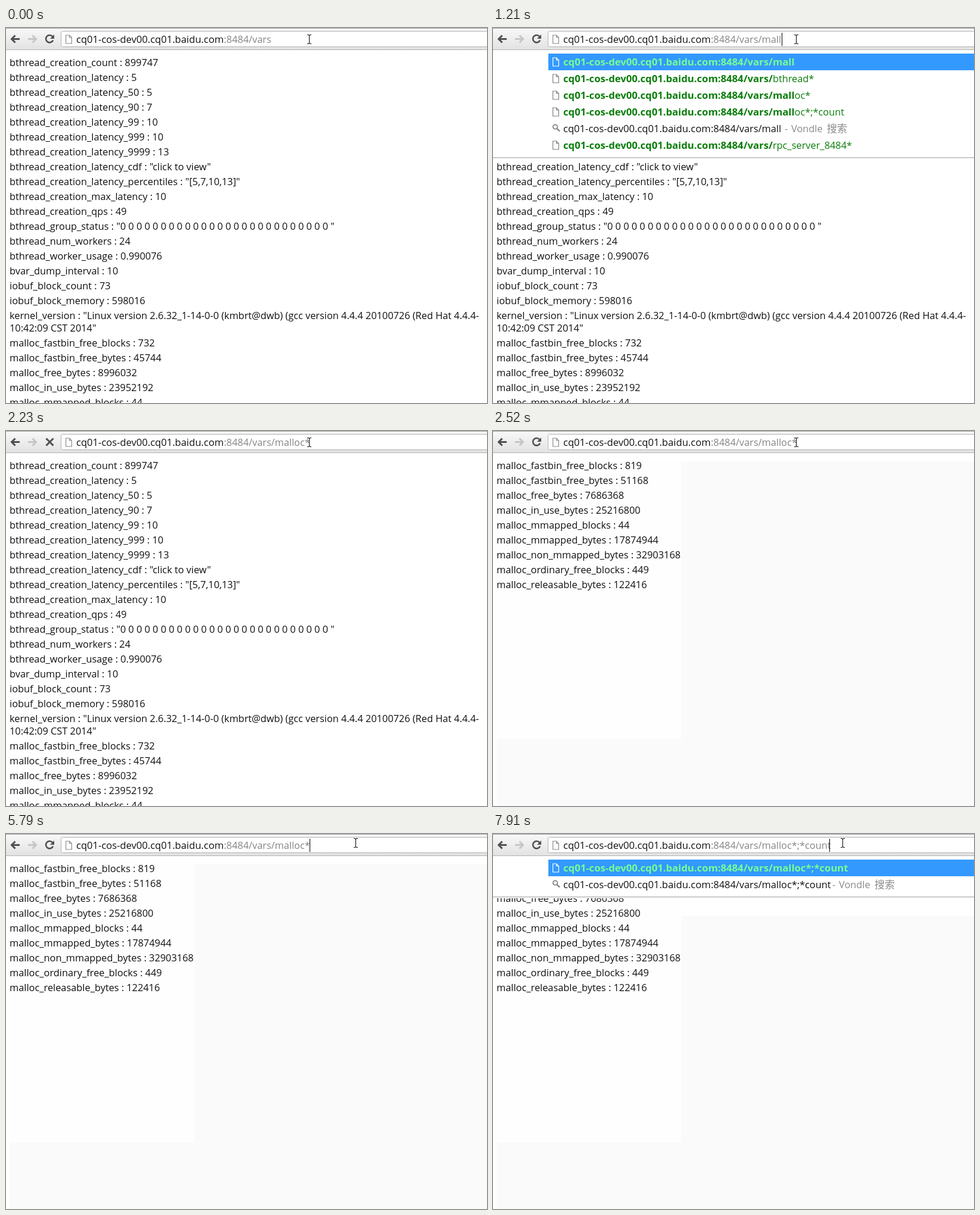
Write an HTML page that moves like this. It is 808 px wide and 630 px high and loops after 8000 ms.

```html
<!DOCTYPE html>
<html lang="en">
<head>
<meta charset="utf-8">
<title>Server variables</title>
<style>
  html, body { margin: 0; width: 100%; height: 100%; overflow: hidden; background: #fff; }
  svg { display: block; }
  text { font: 16.35px "Open Sans", "Noto Sans", "Noto Sans CJK SC", sans-serif; white-space: pre; }
  .host { font-size: 16.6px; }
  .bold { font-size: 16.7px; font-weight: 700; }
  .cjk { font: 17px "Noto Sans CJK SC", "Noto Sans CJK", sans-serif; }
</style>
</head>
<body>
<svg width="808" height="630" viewBox="0 0 808 630">
  <defs>
    <linearGradient id="bar" x2="0" y2="1">
      <stop stop-color="#f8f8f8"/><stop offset="1" stop-color="#e2e2e2"/>
    </linearGradient>
    <g id="sheet" fill="none" stroke-width="1.2">
      <path d="M.6-7H6.5L10.4-3V7H.6ZM6.5-7V-3H10.4"/>
    </g>
    <g id="lens" fill="none" stroke="#808080">
      <circle cx="4.5" cy="-2" r="3.7" stroke-width="1.7"/><path d="M7.4 1L12 5.4" stroke-width="2.4"/>
    </g>
  </defs>
  <g id="page"></g>
  <g id="popup"></g>
  <g>
    <rect width="808" height="37" fill="url(#bar)"/>
    <path d="M0 .5H808" stroke="#a0a0a0"/>
    <path d="M0 36.5H808" stroke="#b2b2b2"/>
    <rect x="92.5" y="5.5" width="730" height="26" rx="3" fill="#fff" stroke="#b0b0b0"/>
    <g fill="none" stroke-width="3">
      <path d="M23 18.5H10M15.5 12.5L9.5 18.5L15.5 24.5" stroke="#505050"/>
      <path d="M37 18.5H50M44.5 12.5L50.5 18.5L44.5 24.5" stroke="#c6c6c6"/>
    </g>
    <use href="#sheet" x="100" y="19" stroke="#8c8c8c"/>
  </g>
  <g id="address"></g>
  <g id="mouse"></g>
</svg>
<script>
const LOOP = 8000;
const HOST = 'cq01-cos-dev00.cq01.baidu.com', PORT = ':8484';
const GREEN = '#0a7d0a', BLUE = '#3399ff';

const ALL_VARS = `bthread_creation_count : 899747
bthread_creation_latency : 5
bthread_creation_latency_50 : 5
bthread_creation_latency_90 : 7
bthread_creation_latency_99 : 10
bthread_creation_latency_999 : 10
bthread_creation_latency_9999 : 13
bthread_creation_latency_cdf : "click to view"
bthread_creation_latency_percentiles : "[5,7,10,13]"
bthread_creation_max_latency : 10
bthread_creation_qps : 49
bthread_group_status : "${'0 '.repeat(26)}"
bthread_num_workers : 24
bthread_worker_usage : 0.990076
bvar_dump_interval : 10
iobuf_block_count : 73
iobuf_block_memory : 598016
kernel_version : "Linux version 2.6.32_1-14-0-0 (kmbrt@dwb) (gcc version 4.4.4 20100726 (Red Hat 4.4.4-
10:42:09 CST 2014"
malloc_fastbin_free_blocks : 732
malloc_fastbin_free_bytes : 45744
malloc_free_bytes : 8996032
malloc_in_use_bytes : 23952192
malloc_mmapped_blocks : 44`.split('\n');

const MALLOC_VARS = `malloc_fastbin_free_blocks : 819
malloc_fastbin_free_bytes : 51168
malloc_free_bytes : 7686368
malloc_in_use_bytes : 25216800
malloc_mmapped_blocks : 44
malloc_mmapped_bytes : 17874944
malloc_non_mmapped_bytes : 32903168
malloc_ordinary_free_blocks : 449
malloc_releasable_bytes : 122416`.split('\n');

// Suggestion lists; TYPED repeats the input, SEARCH offers a web search.
const TYPED = 0, SEARCH = 1;
const WIDE = [TYPED, 'bthread*', 'malloc*', 'malloc*;*count', SEARCH, 'rpc_server_8484*'];
const EXACT = [TYPED, 'malloc*;*count', 'bthread*', 'iobuf*', SEARCH, 'rpc_server_8484*'];
const SHORT = [TYPED, 'malloc*;*count', SEARCH];
const LAST = [TYPED, SEARCH];

// time, path, end of the input, caret visible, suggestions
const INPUT = [
  [0, '/vars', 446, false],
  [140, '/vars', 446, true],
  [390, '/vars/', 452, true, WIDE],
  [820, '/vars/m', 467, true, WIDE],
  [970, '/vars/ma', 475, true, WIDE],
  [1090, '/vars/mal', 480, true, WIDE],
  [1210, '/vars/mall', 485, true, WIDE],
  [1370, '/vars/mallo', 495, true, WIDE],
  [1520, '/vars/malloc', 503, true, WIDE],
  [1790, '/vars/malloc*', 510, true, EXACT],
  [2230, '/vars/malloc*', 510, false],
  [4180, '/vars/malloc*', 510, true],
  [4440, '/vars/malloc*', 510, false],
  [4700, '/vars/malloc*', 510, true],
  [5240, '/vars/malloc*', 510, false],
  [5790, '/vars/malloc*', 510, true],
  [5910, '/vars/malloc*;', 514, true, SHORT],
  [6380, '/vars/malloc*;', 514, false, SHORT],
  [6930, '/vars/malloc*;*', 521, true, SHORT],
  [7210, '/vars/malloc*;*c', 529, true, SHORT],
  [7360, '/vars/malloc*;*cou', 549, true, SHORT],
  [7630, '/vars/malloc*;*coun', 559, true, SHORT],
  [7910, '/vars/malloc*;*count', 565, true, LAST]
];
const SELECTED_AT = 4440;

const PAGES = [[0, 'all'], [2370, 'blank'], [2520, 'malloc'], [7910, 'repainted']];
const STOP_ICON = [[0, false], [2230, true], [2520, false]];
const MOUSE = [
  [0, 'beam', 509, 19], [3620, 'arrow', 552, -13], [3760, 'arrow', 554, -13],
  [3910, 'arrow', 545, -6], [4030, 'beam', 534, 12], [4180, 'beam', 545, 13],
  [4440, 'beam', 587, 15]
];

const at = (steps, t) => steps.findLast(step => step[0] <= t);
const rect = (x, y, w, h, fill) => `<rect x="${x}" y="${y}" width="${w}" height="${h}" fill="${fill}"/>`;
const text = (x, y, content, fill = '#111', cls = '') =>
  `<text x="${x}" y="${y}" fill="${fill}" class="${cls}">${content}</text>`;

function drawPage([, kind]) {
  const lines = kind === 'all' ? ALL_VARS : kind === 'blank' ? [] : MALLOC_VARS;
  let out = rect(0, 37, 808, 593, '#fff');
  if (kind !== 'all') out += rect(6, 51, 802, 579, '#fafafa');
  if (lines === MALLOC_VARS) out += rect(6, 51, 310, 467, '#fefefe');
  if (kind === 'repainted') out += rect(316, 51, 492, 86, '#fff');
  let y = 64;
  for (const line of lines) {
    if (line.startsWith('10:42')) y -= 4;
    out += text(6, y, line);
    y += 25;
  }
  return out;
}

function suggestion(item, i, path, end) {
  const mid = 57 + 28 * i, base = mid + 6;
  if (item === SEARCH) {
    return `<use href="#lens" x="100" y="${mid - 1}"/>` +
      text(118, base, HOST, '#111', 'host') + text(366, base, PORT + path) +
      text(end + 5, base, '-', '#8a8a8a') + text(end + 16, base, 'Vondle', '#8a8a8a') +
      text(end + 76, base, '搜索', '#8a8a8a', 'cjk');
  }
  const typed = item === TYPED;
  const target = typed ? path : '/vars/' + item;
  let same = 0;
  while (same < target.length && target[same] === path[same]) same++;
  const label = `<tspan class="bold">${HOST + PORT + target.slice(0, same)}</tspan>${target.slice(same)}`;
  return (typed ? rect(93, mid - 14, 715, 28, BLUE) : '') +
    `<use href="#sheet" x="100" y="${mid}" stroke="${typed ? '#fff' : '#808080'}"/>` +
    text(118, base, label, typed ? '#78ff90' : GREEN);
}

function drawPopup([, path, end, , items]) {
  if (!items) return '';
  const bottom = 50 + 28 * items.length;
  return rect(0, 37, 808, bottom - 37, '#fff') +
    rect(0, bottom - 1, 808, 1, '#b4b4b4') + rect(0, bottom, 808, 1, '#e6e6e6') +
    rect(0, bottom + 1, 808, 1, '#f5f5f5') +
    items.map((item, i) => suggestion(item, i, path, end)).join('');
}

function drawAddress([start, path, end, caret], [, loading]) {
  const selected = start === SELECTED_AT;
  const icon = loading
    ? '<path d="M67.5 12.5L79.5 24.5M79.5 12.5L67.5 24.5" stroke="#505050" stroke-width="3"/>'
    : '<path d="M78.3 14.6A6.2 6.2 0 1 0 79 20.5" fill="none" stroke="#505050" stroke-width="2.6"/>' +
      '<path d="M81 11V18H74Z" fill="#505050"/>';
  return icon + (selected ? rect(118, 8, end - 118, 22, BLUE) : '') +
    text(118, 25, HOST, selected ? '#fff' : '#111', 'host') +
    text(366, 25, PORT + path, selected ? '#fff' : '#858585') +
    (caret ? rect(end, 8, 1, 22, '#000') : '');
}

function drawMouse([, kind, x, y]) {
  const shape = kind === 'beam'
    ? '<path d="M-3-7.5H-1L.5-6.5L2-7.5H4M.5-7V7M-3 7.5H-1L.5 6.5L2 7.5H4" fill="none" stroke="#111" stroke-width="1.1"/>'
    : '<path d="M.5.5V16.5L4.3 13L7 19H9.5L7 12.2H12Z" fill="#fff" stroke="#111"/>';
  return `<g transform="translate(${x} ${y})">${shape}</g>`;
}

const layers = {
  page: t => drawPage(at(PAGES, t)),
  popup: t => drawPopup(at(INPUT, t)),
  address: t => drawAddress(at(INPUT, t), at(STOP_ICON, t)),
  mouse: t => drawMouse(at(MOUSE, t))
};
const shown = {};

function render(now) {
  const t = now % LOOP;
  for (const id in layers) {
    const markup = layers[id](t);
    if (markup !== shown[id]) document.getElementById(id).innerHTML = shown[id] = markup;
  }
}

const began = performance.now();
function tick() {
  render(performance.now() - began);
  requestAnimationFrame(tick);
}
tick();
</script>
</body>
</html>
```
